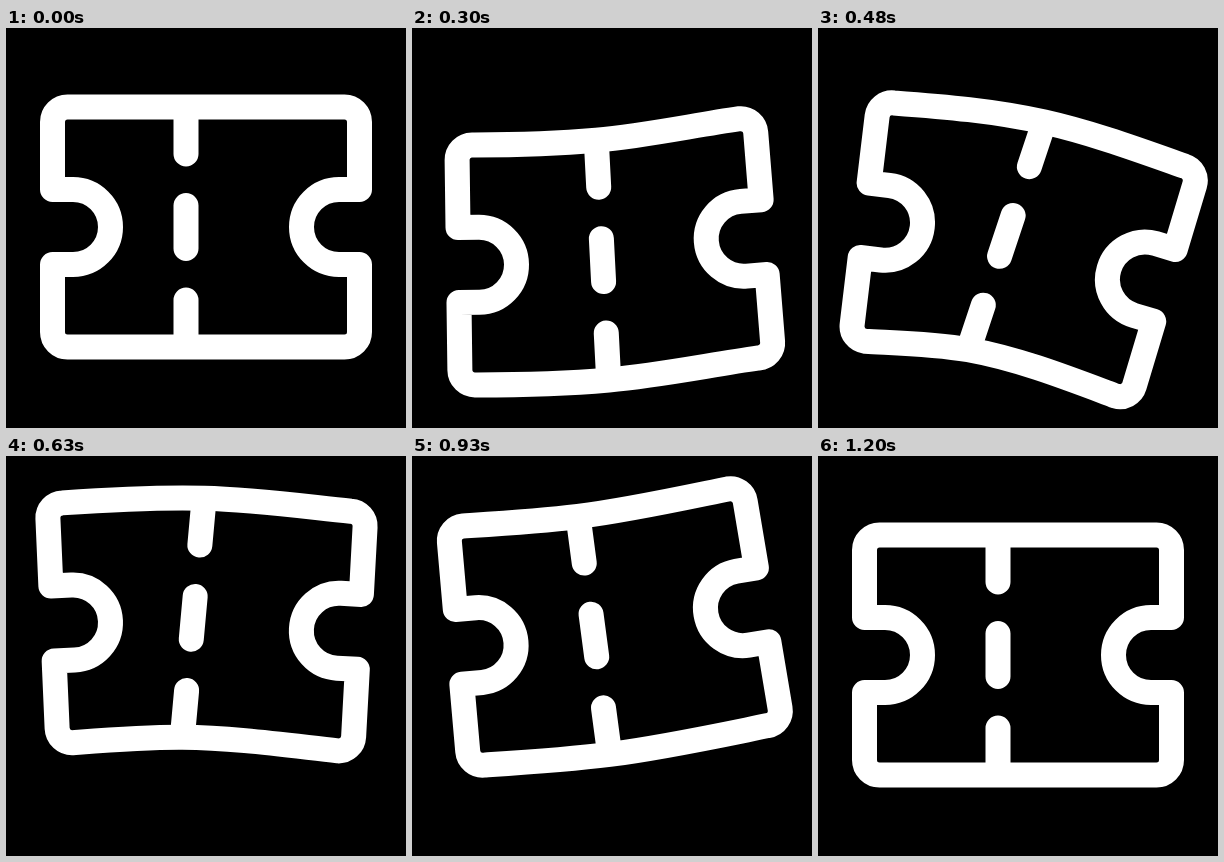
Recreate the animation shown at these times as an HTML page. Size 400x400 px, loop 1.23 s.

```html
<!DOCTYPE html>
<html lang="en">
<head>
<meta charset="utf-8">
<title>Ticket</title>
<style>
  html, body { margin: 0; height: 100%; overflow: hidden; background: #000; }
  svg { display: block; width: 100vw; height: 100vh; }
  path { fill: none; stroke: #fff; stroke-width: 25; stroke-linecap: round; stroke-linejoin: round; }
</style>
</head>
<body>
<svg viewBox="0 0 400 400">
  <path id="outline"/>
  <path id="dashes"/>
</svg>
<script>
const LOOP = 1230, STEP = 30;
const LEFT_X = 67, REST_Y = 199;     // left notch centre
const SPAN = 266, FOLD = 113;        // distances from there to the right notch and the dashes
const EDGE = 20.5, HALF = 120, R = 15, NOTCH = 37.5;

// Turning points of the swing: the left end leads, the rest follows
const LEAD = [150, 410, 760, 1200];
const FOLLOW = [178, 448, 820, 1200];
const BOB = [250, 650, 1090];

// Eases from rest through each peak in turn and back to rest
function swing(t, beats, ...peaks) {
  const i = beats.findIndex(b => t < b);
  if (i < 0) return 0;
  const from = peaks[i - 1] || 0, to = peaks[i] || 0, begin = beats[i - 1] || 0;
  const u = (t - begin) / (beats[i] - begin);
  return from + (to - from) * u * u * (3 - 2 * u);
}

// Local frame at (x, y), tilted counter-clockwise
function frame([x, y], deg) {
  const a = deg * Math.PI / 180, c = Math.cos(a), s = Math.sin(a);
  const at = (u, v) => [x + u * c + v * s, y - u * s + v * c];
  at.slope = -Math.tan(a);
  return at;
}

const pt = p => p.map(v => v.toFixed(2)).join(" ");
const line = p => "L" + pt(p);
const arc = (r, sweep, p) => `A${r} ${r} 0 0 ${sweep} ${pt(p)}`;

function curve(a, b, sa, sb) {
  const d = (b[0] - a[0]) / 3;
  return `C${pt([a[0] + d, a[1] + sa * d])} ${pt([b[0] - d, b[1] - sb * d])} ${pt(b)}`;
}

// Bent side running from a through m to b
function bend(a, m, b, tiltA, tiltB) {
  const d1 = m[0] - a[0], d2 = b[0] - m[0];
  const s1 = (m[1] - a[1]) / d1, s2 = (b[1] - m[1]) / d2;
  const sm = (s1 * d2 + s2 * d1) / (d1 + d2);
  return curve(a, m, (2 * s1 - sm + tiltA) / 2, sm) +
         curve(m, b, sm, (2 * s2 - sm + tiltB) / 2);
}

const outline = document.getElementById("outline");
const dashes = document.getElementById("dashes");

function draw(t) {
  const leftTilt = swing(t, LEAD, 15.5, -8.5, 7.5);
  const tilt = swing(t, FOLLOW, 19.4, -12.8, 10);
  const midTilt = swing(t, FOLLOW, 19.4, -19, 9.5);
  const rightTilt = swing(t, FOLLOW, 21, -17.3, 12);
  const drift = swing(t, BOB, 10.5, 7);
  const sag = 0.85 * (rightTilt + tilt - 2 * leftTilt);

  const pivot = [LEFT_X, REST_Y + swing(t, BOB, 41, -33)];
  const axis = frame(pivot, tilt);
  const left = frame(pivot, leftTilt);
  const mid = frame(axis(FOLD + drift, sag), midTilt);
  const right = frame(axis(SPAN, 0), rightTilt);
  const inX = EDGE - R, inY = HALF - R;

  outline.setAttribute("d",
    "M" + pt(left(0, NOTCH)) + line(left(-EDGE, NOTCH)) + line(left(-EDGE, inY)) +
    arc(R, 0, left(-inX, HALF)) +
    bend(left(-inX, HALF), mid(0, HALF), right(inX, HALF), left.slope, right.slope) +
    arc(R, 0, right(EDGE, inY)) +
    line(right(EDGE, NOTCH)) + line(right(0, NOTCH)) +
    arc(NOTCH, 1, right(0, -NOTCH)) +
    line(right(EDGE, -NOTCH)) + line(right(EDGE, -inY)) +
    arc(R, 0, right(inX, -HALF)) +
    bend(right(inX, -HALF), mid(0, -HALF), left(-inX, -HALF), right.slope, left.slope) +
    arc(R, 0, left(-EDGE, -inY)) +
    line(left(-EDGE, -NOTCH)) + line(left(0, -NOTCH)) +
    arc(NOTCH, 1, left(0, NOTCH)) + "Z");

  const dash = (a, b) => "M" + pt(mid(0, a)) + line(mid(0, b));
  dashes.setAttribute("d", dash(4 - HALF, -73) + dash(-21.5, 21.5) + dash(73, HALF - 4));
}

const start = performance.now();
function tick() {
  const t = (performance.now() - start) % LOOP;
  draw(Math.floor(t / STEP) * STEP);
  requestAnimationFrame(tick);
}
tick();
</script>
</body>
</html>
```
